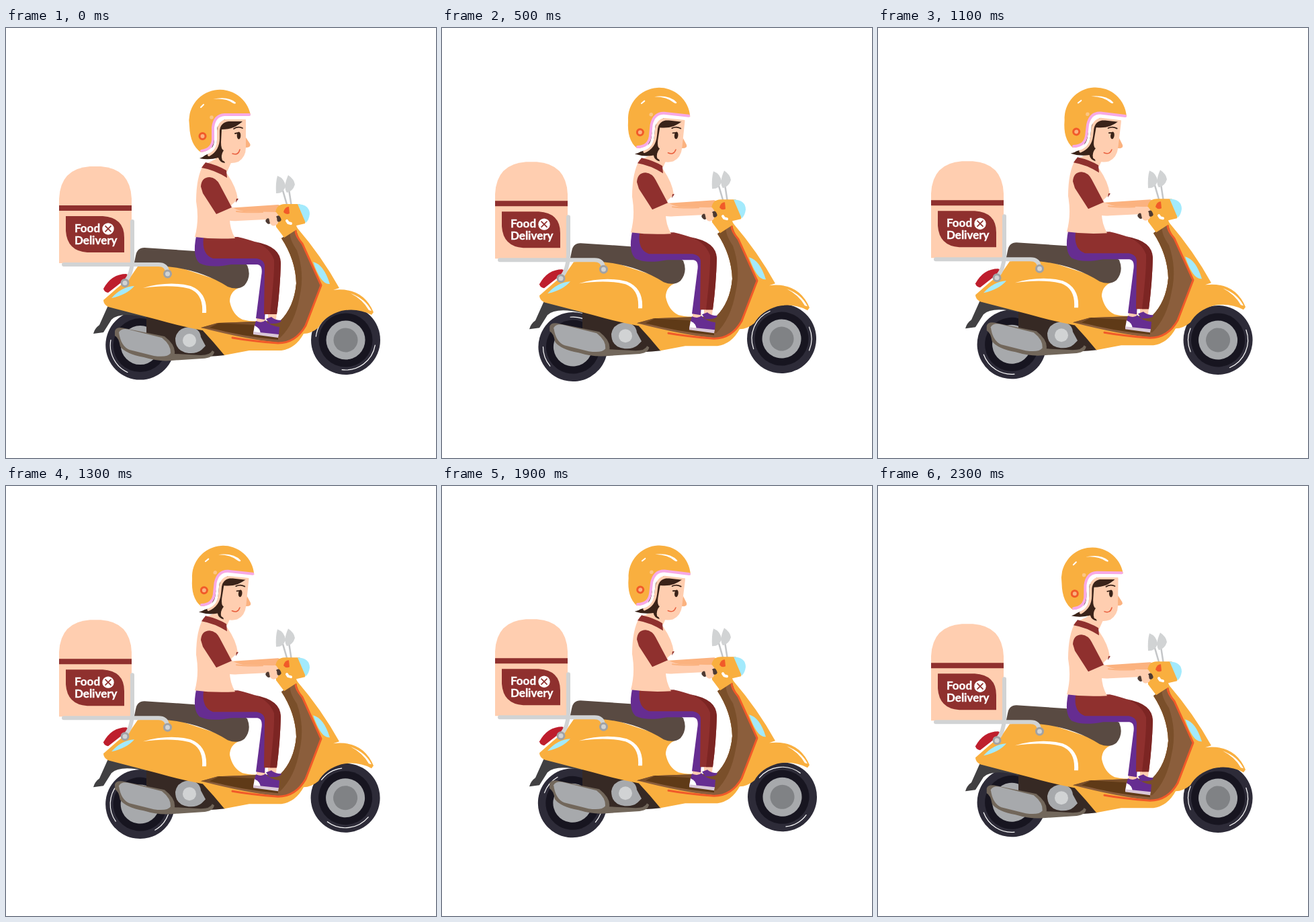
Animation of 640 by 640 pixels, one loop 2.4 s. Source, as an HTML page:

```html
<!DOCTYPE html>
<html lang="en">
<head>
<meta charset="utf-8">
<title>Scooter delivery</title>
<style>
html, body { margin: 0; width: 100%; height: 100%; overflow: hidden; background: #fff; }
svg { display: block; width: 100vw; height: 100vh; }
.line { fill: none; stroke-linecap: round; stroke-linejoin: round; }
.peach { fill: #ffceb0; }
.red { fill: #8f302e; }
.orange { fill: #f9af3f; }
.purple { fill: #662d91; }
.cyan { fill: #a3eafc; }
.dark { fill: #3a2319; }
.white { fill: #fff; }
.light { fill: #d1d3d4; }
.grey { fill: #a7a9ac; }
text { font: bold 17px Lato, "Open Sans", sans-serif; fill: #fff; stroke: #fff; stroke-width: .4; }
</style>
</head>
<body>
<svg viewBox="0 0 640 640">
  <defs>
    <g id="tire">
      <circle r="51.5" fill="#2d2b38"/>
      <circle r="40" fill="#171520"/>
      <circle r="29" class="grey"/>
    </g>
  </defs>

  <g id="rear"><use href="#tire"/></g>
  <g id="front"><use href="#tire"/><circle r="18" fill="#808285"/></g>

  <g id="bike">
    <!-- engine and exhaust -->
    <path fill="#362924" d="M209 424L292 445L326 487Q285 491 250 489L209 458Z"/>
    <path fill="#414042" d="M152 413L209 427V431Q170 422 157 434L145 453L130 455Q132 447 139 442Z"/>
    <path class="grey" d="M252 462Q255 446 273 445Q289 447 290 460L297 473L291 479Q284 485 272 484Q252 482 252 462Z"/>
    <circle cx="273" cy="465" r="10" class="light"/>
    <g id="muffler">
      <path fill="#72675b" d="M162 451Q164 444 177 447L236 459Q253 472 251 485L290 487Q304 487 307 480L310 482Q309 491 292 492L246 495Q228 497 205 490Q178 485 170 474Q168 461 162 458Z"/>
      <path class="grey" d="M168 453Q172 446 184 449L232 461Q246 472 245 484Q240 491 220 488L184 479Q171 474 168 453Z"/>
    </g>

    <!-- bodywork -->
    <path class="orange" d="M145 405Q165 387 185 371L196 355L245 352L348 386Q333 392 333 407Q337 427 352 434L372 438L292 450Q260 444 225 434L152 415Q145 411 145 405Z"/>
    <path class="orange" d="M290 447L350 436L408 437Q429 415 432 380Q431 345 410 313L433 297Q470 340 496 387L487 390Q531 385 547 423L544 427Q523 416 499 421Q475 428 465 446Q454 455 443 455Q431 477 410 480L362 480L325 487L309 468Z"/>
    <path fill="#8b5e3c" d="M410 313L432 300Q433 307 440 320L470 383L443 447Q430 468 405 468Q360 464 290 446L315 439L370 437L408 436Q429 415 432 380Q431 345 410 313Z"/>
    <path fill="#7a4f2a" d="M410 313L423 304Q421 313 433 331Q445 365 437 400Q430 440 408 461L290 446L315 439L370 437L408 436Q429 415 432 380Q431 345 410 313Z"/>
    <path fill="#5f3a17" d="M303 446L317 439L369 442V456L405 459V464Q350 459 303 446Z"/>
    <path class="line" stroke="#f15a29" stroke-width="3" d="M431 302Q431 309 441 321L469 383L446 443Q431 469 405 469Q365 466 337 461"/>
    <path class="cyan" d="M457 348Q473 352 482 381Q469 383 457 348Z"/>
    <path class="white" d="M513 395Q535 403 544 421L540 420Q531 404 513 395Z"/>
    <path class="white" d="M204 387Q242 376 275 384Q300 394 298 424H292Q294 396 273 388Q245 381 204 387Z"/>
    <path fill="#be1e2d" d="M145 388Q157 366 179 366L184 369L152 394Q146 393 145 388Z"/>
    <path class="cyan" d="M157 402Q172 385 191 384Q180 397 157 402Z"/>
    <path fill="#594a42" d="M193 339Q195 327 206 327L281 332Q340 340 359 353Q366 370 355 383Q345 391 330 385Q290 360 240 355L190 354Z"/>

    <!-- delivery box -->
    <path class="peach" d="M79 350V254Q81 209 125 206H141Q185 209 187 254V350Z"/>
    <path class="red" d="M79 264H187V272H79ZM89 280H144Q176 282 176 312V334H121Q91 332 89 302Z"/>
    <text x="102" y="304">Food</text>
    <text x="102" y="322">Delivery</text>
    <circle cx="152" cy="299" r="8.7" class="white"/>
    <path class="line" stroke="#8f302e" stroke-width="1.7" d="M148 295L156 303M156 295L148 303"/>
    <path class="line" stroke="#d1d3d4" stroke-width="6" d="M86 352H227Q239 352 240 363M188 288V347Q187 367 178 377"/>
    <g fill="#d1d3d4" stroke="#a0a2a5" stroke-width="3">
      <circle cx="177" cy="379.5" r="5"/>
      <circle cx="240.500" cy="366" r="5"/>
    </g>

    <!-- handlebar, lamp and mirrors -->
    <path class="line" stroke="#c4c6c8" stroke-width="2.500" d="M419 266L412 242M425 266L421 240"/>
    <path class="light" d="M404 220Q415 224 416 236Q412 247 402 246Q401 230 404 220ZM420 219Q429 225 430 233Q427 243 418 245Q412 237 420 219Z"/>
    <path fill="#fbb27f" d="M330 268L405 263L413 266L403 274L330 281Z"/>
    <path class="orange" d="M401 276Q402 262 415 262H437Q450 275 445 291L432 294L434 299L414 312L402 296Z"/>
    <path class="cyan" d="M434 262Q452 263 452 277Q451 286 446 290Z"/>
    <path fill="#f15a29" d="M413 274Q415 266 421 266L422 276Q417 279 413 274Z"/>
    <path class="line" stroke="#fff" stroke-width="4" d="M418 287L420 290L424 291"/>

    <!-- legs -->
    <path class="peach" d="M390 424H403L402 434H390ZM373 431H386V441H373Z"/>
    <path class="purple" d="M387 433L395 430Q400 435 410 435Q409 441 392 440Z"/>
    <path class="purple" d="M283 310Q277 340 288 350Q304 358 335 352H374Q383 353 380 369L372 432L385 434L391 353Q386 341 370 342L310 340L296 312Z"/>
    <path class="red" d="M294 312Q291 337 308 343L373 343Q386 345 385 357L384 426H403Q408 388 409 350Q407 325 345 311Z"/>
    <path fill="#7c2523" d="M370 318Q409 325 409 350Q408 388 403 426H393Q400 365 399 345Q392 326 370 318Z"/>
    <path class="purple" d="M370 443L372 436Q381 440 386 435Q392 443 407 445L406 457L368 454Z"/>
    <path class="white" d="M370 443Q378 446 379 455L368 454Z"/>
    <path fill="#d9c7d7" d="M368 452L406 456L405 461L368 456Z"/>

    <!-- head -->
    <path class="peach" d="M312 186L338 194L329 214L298 202L312 195Z"/>
    <g id="head">
      <path class="dark" d="M312 150L325 136L356 137L340 148L325 190Q324 197 326 201Q318 200 316 193Q302 197 288 194Q299 190 306 180Z"/>
      <path class="peach" d="M321 151Q341 151 353 138H357V165L363 175Q363 178 357 178Q357 192 346 199Q333 204 322 197Q319 190 324 182Q320 181 320 170Z"/>
      <path fill="#fbb27f" d="M357 163L363 172Q366 177 357 178Z"/>
      <ellipse cx="346.500" cy="160" rx="2.800" ry="5.500" class="dark"/>
      <path class="line" stroke="#3a2319" stroke-width="1.800" d="M339 150Q345 146 352 149M341 157L346 156"/>
      <path class="line" stroke="#e9603f" stroke-width="1.500" d="M337 187Q346 190 348 181"/>
      <path class="orange" d="M364 130A46 46 0 0 0 273 146Q274 174 290 185Q304 184 307 168V148Q309 131 325 130Z"/>
      <path class="line" stroke="#ffceb0" stroke-width="4" d="M302 189Q316 181 316 164V153Q317 139 331 137H355"/>
      <path class="line" stroke="#fff" stroke-width="4" d="M297 187Q312 182 312 166V150Q314 135 327 134H364"/>
      <path class="line" stroke="#f7a9e6" stroke-width="4" d="M291 183Q307 181 308 166V148Q310 130 325 129H362"/>
      <circle cx="292.500" cy="161" r="6" fill="#f15a29"/>
      <circle cx="292.500" cy="161" r="3" fill="#fbb27f"/>
      <circle cx="306" cy="133" r="2.800" fill="#fcc583"/>
      <path class="white" d="M308 106Q330 101 342 111Q342 114 338 112Q327 104 308 106Z"/>
      <path class="line" stroke="#fff" stroke-width="2" d="M290 118L294 114"/>
    </g>

    <!-- torso and arm -->
    <path class="peach" d="M294 203L329 217Q343 237 345 255L336 263Q328 290 341 313Q310 315 281 311Q288 286 283 258Q283 222 294 203Z"/>
    <path class="red" d="M297 200Q315 204 328 212L329 223Q310 211 291 208Z"/>
    <path class="red" d="M343 254L346 254L342 260Z"/>
    <path class="peach" d="M312 275L334 265Q340 270 354 273L402 274Q410 282 404 292Q397 297 391 288L386 285L345 287Q323 289 312 275Z"/>
    <path class="line" stroke="#fbb27f" stroke-width="2" d="M343 273Q356 275 382 274"/>
    <path class="red" d="M290 236Q291 222 303 222Q313 223 318 233L336 267L313 277L293 246Z"/>
    <path class="line" stroke="#4d3a33" stroke-width="7" d="M390 287L391 288M405 283L406 285"/>
    <path class="peach" d="M391 282Q398 276 403 282L404 291Q398 298 393 291Z"/>
  </g>
</svg>
<script>
const LOOP = 2400, STEP = 100, TURN = 0.3; // ms, ms, degrees per ms
const rad = Math.PI / 180;
const get = id => document.getElementById(id);

function addGlint(wheel, from, to) {
  const point = a => `${44.5 * Math.cos(a * rad)} ${44.5 * Math.sin(a * rad)}`;
  wheel.insertAdjacentHTML("beforeend",
    `<path class="line" stroke="#fff" stroke-width="1.2" d="M${point(from)}A44.500 44.500 0 0 1 ${point(to)}"/>`);
}

// Each wheel spins slightly off centre.
const wheels = [
  { el: get("rear"), x: 197, y: 472.7, off: 2.8, phase: -12, glints: [[115, 190], [-10, 30]] },
  { el: get("front"), x: 505.8, y: 463.5, off: 1, phase: 105, glints: [[10, 97], [187, 233]] }
];
for (const w of wheels) for (const g of w.glints) addGlint(w.el, ...g);

function draw(now) {
  const t = Math.floor(now % LOOP / STEP) * STEP;
  const lift = (1 - Math.cos((t + 20) / 800 * 2 * Math.PI)) / 2;
  const spin = t * TURN;
  for (const w of wheels) {
    const a = (spin + w.phase) * rad;
    w.el.setAttribute("transform",
      `translate(${w.x + w.off * Math.cos(a)} ${w.y + w.off * Math.sin(a)}) rotate(${spin})`);
  }
  get("bike").setAttribute("transform", `translate(0 ${-8.6 * lift})`);
  get("head").setAttribute("transform", `rotate(${7.6 * lift} 284 184)`);
  get("muffler").setAttribute("transform", `translate(${Math.cos((spin - 12) * rad) - 1} 0)`);
}

const start = performance.now();
function tick() {
  draw(performance.now() - start);
  requestAnimationFrame(tick);
}
tick();
</script>
</body>
</html>
```
